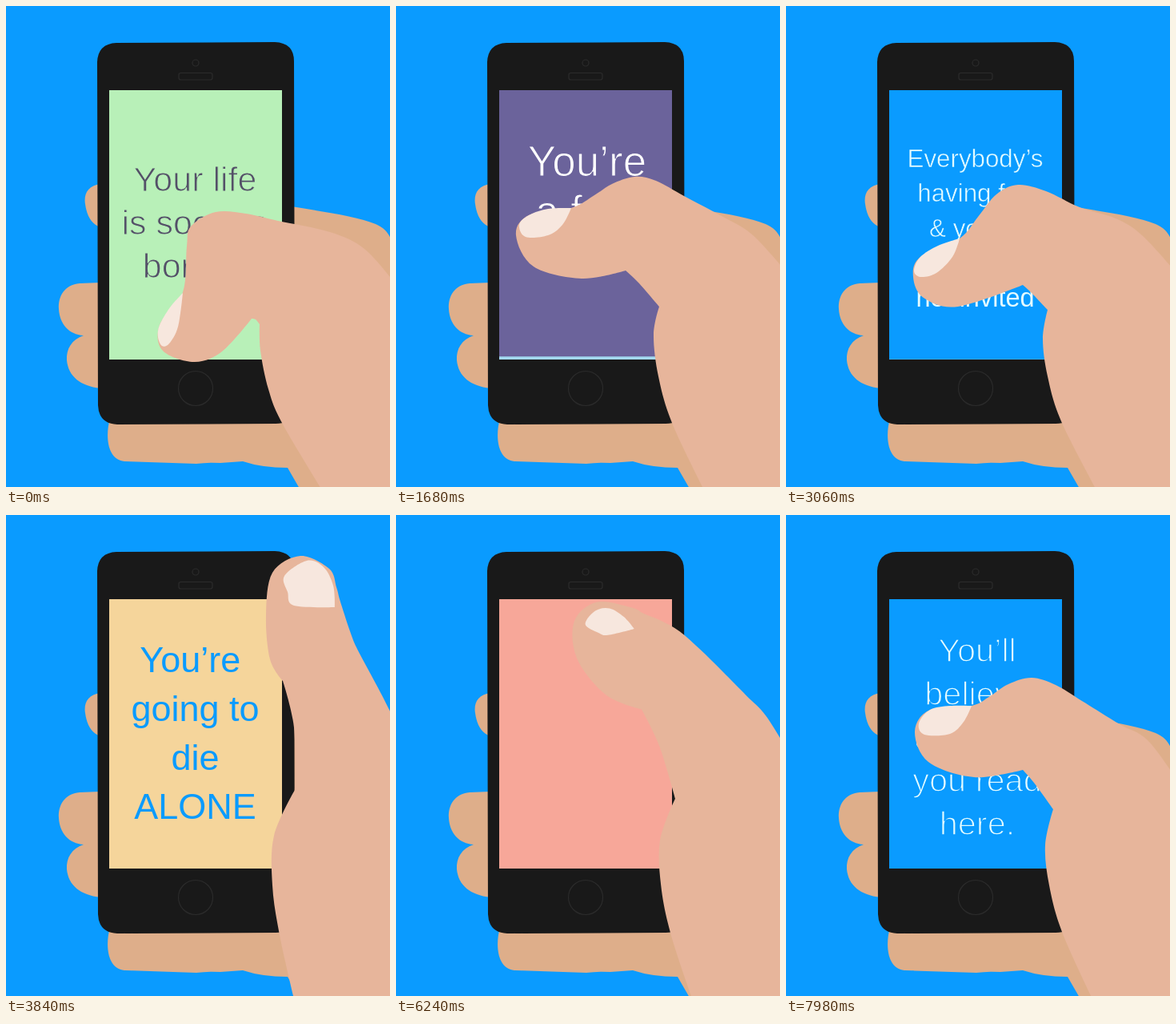
An HTML page that plays this animation: 480x600 px, repeating every 8000 ms.

```html
<!DOCTYPE html>
<html lang="en">
<head>
<meta charset="utf-8">
<title>Thumb scrolling a phone</title>
<style>
html, body { margin: 0; width: 100%; height: 100%; overflow: hidden; background: #0a9bff; }
svg { display: block; }
text { font-family: "Liberation Sans", Arial, sans-serif; text-anchor: middle; }
.line { fill: none; stroke: #2b2b2b; stroke-width: 1.2; }
</style>
</head>
<body>
<svg width="480" height="600" viewBox="0 0 480 600">
  <rect width="480" height="600" fill="#0a9bff"/>
  <g fill="#deae8a">
    <path d="M118 222C102 224 97 235 99 247C101 262 107 272 118 276Z"/>
    <path d="M118 345L92 346C73 348 65 362 66 378C67 397 79 410 97 411C82 416 75 428 76 442C78 462 93 474 118 477Z"/>
    <path d="M130 515C124 535 126 566 148 568L238 571Q252 569 268 570L296 568Q320 576 352 576L367 602H482V292C478 284 474 277 462 272C440 263 400 257 350 249V515Z"/>
  </g>
  <path fill="#191919" d="M138 46L336 45Q360 46 360 69L361 498Q360 521 337 521L139 522Q116 521 115 498L114 70Q115 47 138 46Z"/>
  <circle class="line" cx="237" cy="71" r="4"/>
  <rect class="line" x="216" y="83.500" width="42" height="8.500" rx="2.500"/>
  <circle class="line" cx="237" cy="477" r="21.500"/>
  <svg x="129" y="105" width="216" height="336" overflow="hidden"><g id="feed"></g></svg>
  <path id="thumb" fill="#e7b59b"/>
  <path id="nail" fill="#f7e7de"/>
</svg>
<script>
const PAGE = 336, LOOP = 8000, STEP = 30;
const $ = id => document.getElementById(id);

// thin: how much of each letter stem is trimmed away with the page colour
const pages = [
  { bg: '#b8f0b8', fg: '#545068', size: 43, thin: 1.1, top: 126, gap: 54, lines: ['Your life', 'is sooooo', 'boring.'] },
  { bg: '#6b639b', fg: '#ffffff', size: 53, thin: 1.2, top: 111, gap: 62, lines: ['You’re', 'a fool'], x: 110 },
  { bg: '#a3d8f2' },
  { bg: '#0a9bff', fg: '#e4fbff', size: 31.3, thin: 0.6, top: 96, gap: 43.5, lines: ['Everybody’s', 'having fun', '& you’re', 'still', 'not invited'], strong: 4 },
  { bg: '#f5d59b', fg: '#0a9bff', size: 45, thin: 0, top: 91, gap: 61, lines: ['You’re\u00a0', 'going to', 'die', 'ALONE'] },
  { bg: '#252525' },
  { bg: '#f7a799' },
  { bg: '#0a9bff', fg: '#e4fbff', size: 41.5, thin: 1.5, top: 78, gap: 54, lines: ['You’ll', 'believe', 'anything', 'you read', 'here.'], x: 110 }
];

$('feed').innerHTML = pages.map((p, i) => {
  const text = (p.lines || []).map((s, n) => {
    const strong = n === p.strong;
    return `<text x="${p.x || 107.5}" y="${p.top + n * p.gap}" font-size="${p.size + (strong ? 1.2 : 0)}"
      fill="${p.fg}" stroke="${p.bg}" stroke-width="${strong ? 0 : p.thin}">${s.replace('&', '&amp;')}</text>`;
  }).join('');
  return `<g transform="translate(0 ${i * PAGE})"><rect width="216" height="${PAGE + 0.5}" fill="${p.bg}"/>${text}</g>`;
}).join('');

// Poses: thumb outline from the right edge round the tip to the palm, then the nail
const points = s => s.trim().split(' ').map(p => p.split(',').map(Number));
const pose = (thumb, nail) => ({ thumb: points(thumb), nail: points(nail) });
const up = pose(
  '490,265 470,225 455,197 438,165 430,145 423,124 417,105 413,90 404,67 368,51 333,72 325,125 330,180 346,207 360,265 361,343 335,400 333,462 342,524 360,604',
  '411,115 409,88 397,65 376,57 348,76 352,96 360,113');
const high = pose(
  '490,332 452,281 417,261 370,232 337,212 307,203 278,211 255,226 232,238 180,243 161,270 178,308 235,327 296,318 310,334 334,367 324,412 329,462 345,520 383,604',
  '232,238 205,238 180,243 166,260 173,274 205,273 222,258');
const middle = pose(
  '490,334 445,285 405,261 360,237 325,218 298,213 270,222 248,236 219,252 166,261 150,286 172,325 232,340 287,330 303,345 329,375 322,410 328,462 345,520 385,604',
  '219,252 190,253 166,261 154,273 162,288 190,286 208,273');
const low = pose(
  '490,335 445,286 412,265 367,251 325,231 290,223 263,235 240,263 217,290 168,313 159,338 172,364 215,375 296,348 307,358 327,379 321,415 327,462 344,518 388,604',
  '217,290 190,299 168,313 160,330 168,338 188,333 208,313');
const curled = pose(
  '490,350 448,303 405,282 340,268 300,259 262,257 231,275 226,300 221,357 192,398 196,430 235,444 270,431 307,390 312,391 317,397 318,430 328,478 345,520 395,604',
  '221,358 205,376 192,398 190,413 195,424 204,421 215,400');

// One stroke of the thumb: [ms since its start, pose, easing]
const linear = x => x, easeIn = x => x * x, easeOut = x => x * (2 - x);
const stroke = [
  [0, up], [330, high, easeIn], [355, middle], [380, low], [400, curled],
  [450, curled], [500, low], [540, middle], [555, high], [790, up, easeOut]
];

// Swipes: [thumb start, scroll start, scroll length, pages]
const swipes = [
  [-400, 50, 800, 1], [1140, 1590, 800, 2], [2560, 3020, 800, 1],
  [4380, 4833, 800, 2], [6020, 6500, 936, 1], [7650, LOOP, 800, 0]
];

const clamp = x => Math.min(1, Math.max(0, x));
const inOut = x => x < 0.5 ? 4 * x ** 3 : 1 - 4 * (1 - x) ** 3;

function blend(a, b, k, bulge) {
  return a.map(([x, y], i) => {
    const w = bulge(i) * 4 * k * (1 - k);
    return [x + (b[i][0] - x) * k - 34 * w, y + (b[i][1] - y) * k - 28 * w];
  });
}

// Smooth curve through the points; corners get no tangent
function curve(pts, corners, closed) {
  const n = pts.length, last = closed ? n : n - 1;
  const at = i => closed ? pts[(i + n) % n] : pts[Math.min(n - 1, Math.max(0, i))];
  const handle = (i, dir) => at(i).map((v, c) =>
    corners.includes(i % n) ? v : v + dir * (at(i + 1)[c] - at(i - 1)[c]) / 6);
  let d = 'M' + pts[0];
  for (let i = 0; i < last; i++) d += `C${handle(i, 1)} ${handle(i + 1, -1)} ${at(i + 1)}`;
  return d;
}

function drawThumb(ms) {
  const end = stroke.findIndex(k => k[0] > ms);
  const j = end < 0 ? stroke.length - 1 : end;
  const [t0, a] = stroke[j - 1], [t1, b, ease = linear] = stroke[j];
  const k = ease(clamp((ms - t0) / (t1 - t0)));
  const swing = (a === up) !== (b === up) ? 1 : 0;
  // the tip travels on an arc, the palm hardly at all
  const outline = blend(a.thumb, b.thumb, k, i => swing * clamp(Math.min(i - 3, 15 - i) / 4));
  $('thumb').setAttribute('d', curve(outline, [13, 15], false) + 'H492Z');
  $('nail').setAttribute('d', curve(blend(a.nail, b.nail, k, () => swing), [0], true) + 'Z');
}

function frame(now) {
  const t = Math.floor(now % LOOP / STEP) * STEP;
  let scroll = 0, start = 0;
  for (const [thumb, from, length, count] of swipes) {
    if (t >= thumb) start = thumb;
    scroll += count * inOut(clamp((t - from) / length));
  }
  $('feed').setAttribute('transform', `translate(0 ${-scroll * PAGE})`);
  drawThumb(t - start);
}

const began = performance.now();
function tick() {
  frame(performance.now() - began);
  requestAnimationFrame(tick);
}
tick();
</script>
</body>
</html>
```
